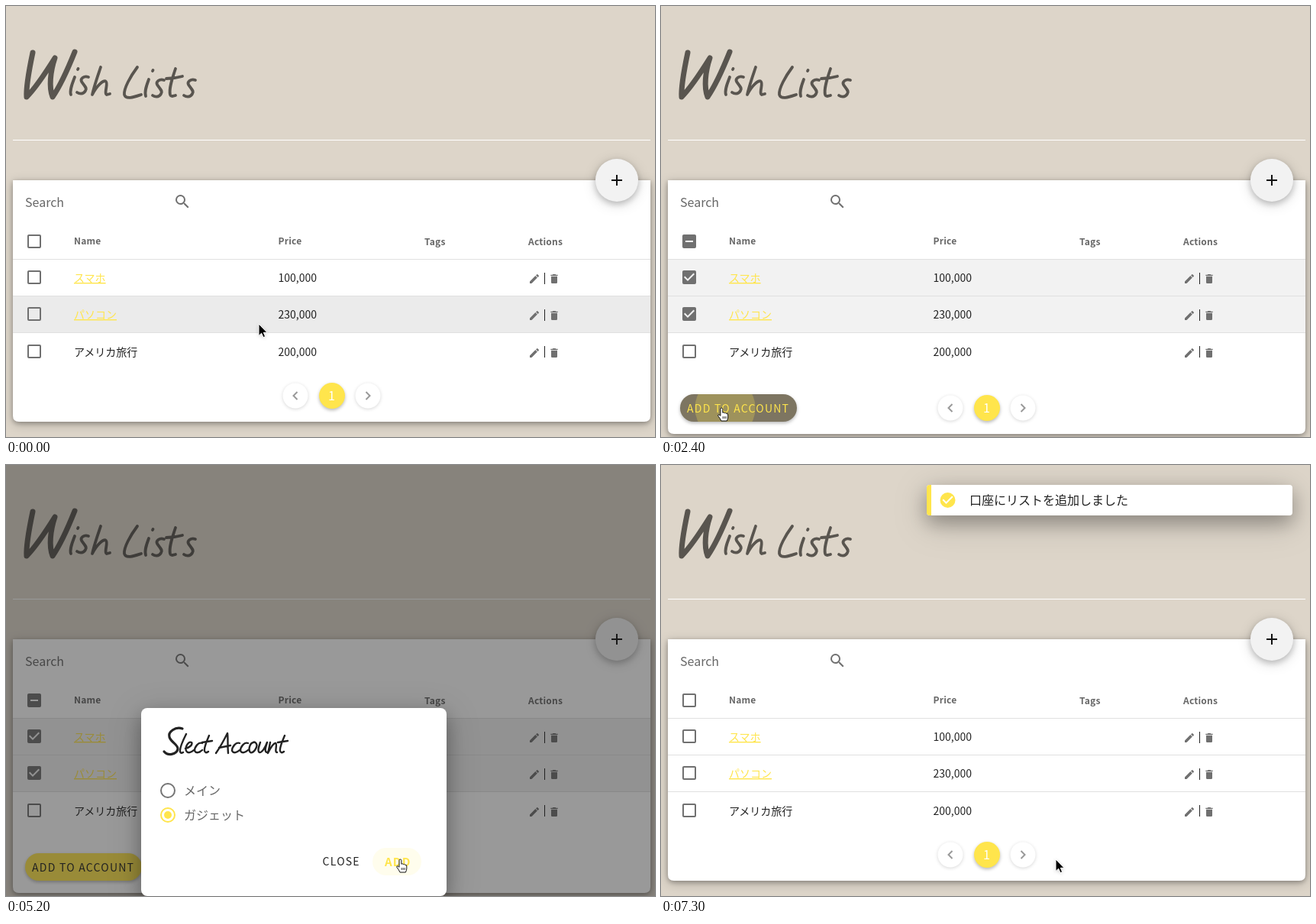
An HTML page that plays this animation: 850x564 px, repeating every 7400 ms.

```html
<!DOCTYPE html>
<html lang="ja">
<head>
<meta charset="utf-8">
<title>Wish Lists</title>
<style>
html, body { margin: 0; width: 100%; height: 100%; overflow: hidden; background: #ddd5c9; }
svg { display: block; width: 850px; height: 564px; font: 14px "Noto Sans CJK JP", "Noto Sans CJK", sans-serif; }
.ink { fill: rgba(0,0,0,.87); }
.soft { fill: rgba(0,0,0,.6); }
.icon { fill: #707070; fill-rule: evenodd; }
.yellow { fill: #ffe54c; }
.head { font-size: 12px; font-weight: 700; letter-spacing: .2px; }
.link { fill: #ffe54c; text-decoration: underline; }
.big { font-size: 16px; }
.caps { font-weight: 500; letter-spacing: 1.25px; }
.line { stroke: rgba(0,0,0,.12); }
.script { fill: none; stroke-linecap: round; stroke-linejoin: round; }
.ring { fill: none; stroke-width: 2; }
.card { filter: drop-shadow(0 2px 3px rgba(0,0,0,.28)) drop-shadow(0 3px 7px rgba(0,0,0,.2)); }
.raised { filter: drop-shadow(0 3px 4px rgba(0,0,0,.2)) drop-shadow(0 3px 8px rgba(0,0,0,.16)); }
.low { filter: drop-shadow(0 2px 2px rgba(0,0,0,.28)); }
.faint { filter: drop-shadow(0 1px 2px rgba(0,0,0,.16)); }
.high { filter: drop-shadow(0 10px 12px rgba(0,0,0,.26)) drop-shadow(0 8px 20px rgba(0,0,0,.18)); }
.halo { fill: rgba(0,0,0,.19); }
</style>
</head>
<body>
<svg id="stage" viewBox="0 0 850 564"></svg>
<script>
const LOOP = 7400, OPEN = 2450, CLOSE = 5210;
const BOX = 'M19 3H5C3.89 3 3 3.89 3 5V19A2 2 0 0 0 5 21H19A2 2 0 0 0 21 19V5C21 3.89 20.1 3 19 3Z';
const ICONS = {
  blank: BOX + 'M19 5V19H5V5Z',
  marked: BOX + 'M10 17L5 12 6.41 10.58 10 14.17 17.59 6.58 19 8Z',
  minus: BOX + 'M17 13H7V11H17Z',
  pencil: 'M20.71 7.04C21.1 6.65 21.1 6 20.71 5.63L18.37 3.29C18 2.9 17.35 2.9 16.96 3.29L15.12 5.12 18.87 8.87ZM3 17.25V21H6.75L17.81 9.93 14.06 6.18Z',
  trash: 'M19 4H15.5L14.5 3H9.5L8.5 4H5V6H19ZM6 19A2 2 0 0 0 8 21H16A2 2 0 0 0 18 19V7H6Z',
  search: 'M9.5 3A6.5 6.5 0 0 1 16 9.5C16 11.11 15.41 12.59 14.44 13.73L14.71 14H15.5L20.5 19 19 20.5 14 15.5V14.71L13.73 14.44C12.59 15.41 11.11 16 9.5 16A6.5 6.5 0 0 1 9.5 3ZM9.5 5A4.5 4.5 0 0 0 9.5 14A4.5 4.5 0 0 0 9.5 5Z',
  done: 'M12 2A10 10 0 0 0 12 22A10 10 0 0 0 12 2ZM10 17L5 12 6.41 10.59 10 14.17 17.59 6.58 19 8Z'
};
const ROWS = [
  { name: 'スマホ', price: '100,000', top: 332, mid: 355, link: true },
  { name: 'パソコン', price: '230,000', top: 380, mid: 403, link: true },
  { name: 'アメリカ旅行', price: '200,000', top: 428, mid: 452 }
];
const RADIOS = [{ label: 'メイン', y: 426 }, { label: 'ガジェット', y: 458 }];

const text = (x, y, s, cls, extra = '') => `<text x="${x}" y="${y}" class="${cls}" ${extra}>${s}</text>`;
const icon = (name, x, y, size = 24, extra = '', cls = 'icon') =>
  `<path ${extra} class="${cls}" fill-rule="evenodd" d="${ICONS[name]}" transform="translate(${x - size / 2} ${y - size / 2}) scale(${size / 24})"/>`;
const checkbox = (id, y) => icon('blank', 37, y, 24, `id="${id}"`);

// Handwritten letters
const sCurve = (x, y) => `M${x} ${y}c-6-2-11 2-9 6 3 5 8 8 5 12-3 5-8 4-11 2`;
const cCurve = x => `M${x} 364c-5-2-10 5-10 10 2 4 7 2 10-1`;
const tCurve = x => `M${x} 354c-3 7-7 16-6 20q1 4 5 1M${x - 9} 363l13-2`;
const bigW = 'M35 61C31 80 26 104 27 119C40 106 54 84 64 68C58 86 56 106 61 119C70 106 82 80 90 60';
const wishLists = 'M90 93C87 101 83 110 85 116M94 83l.5-1' + sCurve(108, 93) +
  'M124 80C120 92 115 106 113 116C119 104 128 96 131 99C134 102 128 114 132 116l4-1' +
  'M172 80C163 92 154 108 155 116C157 123 168 119 177 116' +
  'M187 96C184 104 181 112 183 118M192 85l.5-1' + sCurve(207, 97) +
  'M222 82C218 94 213 108 215 116C216 119 219 118 222 117M210 95C216 95 224 94 231 92' + sCurve(248, 97);
const bigS = 'M231 345C222 342 212 349 214 356C216 363 226 366 225 372C223 379 212 381 207 375';
const selectAccount = 'M236 352C232 360 227 370 228 375q1 3 4 1' +
  'M235 371C240 370 245 366 243 363C239 361 234 369 236 374C238 378 243 376 246 373' +
  cCurve(257) + tCurve(266) +
  'M275 377C280 370 286 359 290 351C291 358 290 368 291 377M279 370L294 367' + cCurve(306) + cCurve(317) +
  'M324 363C319 364 317 373 320 376C324 378 330 369 328 365C327 363 325 362 324 363' +
  'M333 363C331 369 329 375 332 376C335 377 340 369 342 363C340 369 338 376 342 376' +
  'M346 363C345 369 344 373 343 377C346 371 350 364 353 364C356 365 351 376 355 376' + tCurve(365);
const script = (d, color, width) => `<path class="script" d="${d}" stroke="${color}" stroke-width="${width}"/>`;

const rowMarkup = (r, i) => `
  <rect id="row${i}" x="9" y="${r.top}" width="835" height="47"/>
  ${i < 2 ? `<path class="line" d="M9 ${r.top + 47.5}H844"/>` : ''}
  <circle id="halo${i}" class="halo" cx="37" cy="${r.mid}" r="20.4"/>
  ${checkbox('check' + i, r.mid)}
  ${text(89, r.top + 29 + (i > 1), r.name, r.link ? 'link' : 'ink')}
  ${text(356.5, r.top + 29 + (i > 1), r.price, 'ink')}
  ${icon('pencil', 692, r.top + 25 + (i > 1), 16)}
  <path d="M705.5 ${r.top + 17}v15" stroke="#222"/>
  ${icon('trash', 718, r.top + 25 + (i > 1), 16)}`;

const radioMarkup = (r, i) => `
  <circle id="radioHalo${i}" class="halo" cx="212" cy="${r.y}" r="20.4"/>
  <circle id="ring${i}" class="ring" cx="212" cy="${r.y}" r="9"/>
  <circle id="dot${i}" class="yellow" cx="212" cy="${r.y}" r="5"/>
  ${text(233, r.y + 6, r.label, 'soft big')}`;

const pageArrow = (x, dir) => `<circle class="faint" cx="${x}" cy="510" r="16.5" fill="#fff"/>
  <path d="M${x - 2.5 * dir} 505l${5 * dir} 5l${-5 * dir} 5" fill="none" stroke="#999" stroke-width="2"/>`;

document.getElementById('stage').innerHTML = `
  <rect width="850" height="564" fill="#ddd5c9"/>
  <g role="img" aria-label="Wish Lists">${script(bigW, '#59554f', 7)}${script(wishLists, '#59554f', 3.8)}</g>
  <path d="M9 175.5H844" stroke="#fff"/>
  <path id="card" class="card" fill="#fff"/>
  <circle class="raised" cx="800" cy="228" r="28" fill="#f2f2f2"/>
  <path d="M793 228h14M800 221v14" stroke="#111" stroke-width="2"/>
  ${text(25, 263, 'Search', 'soft big')}
  ${icon('search', 231, 256)}
  ${checkbox('checkAll', 308)}
  ${text(89, 312, 'Name', 'soft head')}${text(356.5, 312, 'Price', 'soft head')}
  ${text(548, 313, 'Tags', 'soft head')}${text(684, 313, 'Actions', 'soft head')}
  <path class="line" d="M9 331.5H844"/>
  ${ROWS.map(rowMarkup).join('')}
  <g id="pages">${pageArrow(379, -1)}${pageArrow(474, 1)}
    <circle class="yellow low" cx="427" cy="510" r="17"/>
    ${text(426.5, 516, '1', 'big', 'fill="#fff" text-anchor="middle"')}
  </g>
  <clipPath id="pill"><rect x="25" y="508" width="153" height="36" rx="18"/></clipPath>
  <g id="button">
    <rect id="buttonFace" class="low" x="25" y="508" width="153" height="36" rx="18"/>
    <circle id="ripple" cx="84" cy="526" fill="#ffe54c" opacity=".25" clip-path="url(#pill)"/>
    ${text(34, 532, 'ADD TO ACCOUNT', 'caps', 'id="buttonText"')}
  </g>
  <rect id="overlay" width="850" height="564" fill="#212121"/>
  <g id="dialog">
    <rect class="high" x="177" y="318" width="400" height="246" rx="8" fill="#fff"/>
    <g role="img" aria-label="Slect Account">${script(bigS, '#222', 3.2)}${script(selectAccount, '#222', 2.4)}</g>
    ${RADIOS.map(radioMarkup).join('')}
    ${text(414.5, 524, 'CLOSE', 'caps ink')}
    <rect id="addHover" class="yellow" x="480" y="501" width="64" height="36" rx="18" opacity=".1"/>
    ${text(496, 525, 'ADD', '', 'id="add" font-size="15" font-weight="700" letter-spacing="1.25"')}
  </g>
  <g id="toast">
    <rect class="high" x="348" y="26" width="479" height="40" rx="4" fill="#fff"/>
    <path class="yellow" d="M354 26V66H352Q348 66 348 62V30Q348 26 352 26Z"/>
    ${icon('done', 375.5, 46, 24, '', 'yellow')}
    ${text(404, 52, '口座にリストを追加しました', 'ink big')}
  </g>
  <g id="cursor" stroke-linejoin="round">
    <path id="arrow" class="faint" d="M0 0V15.5L3.6 12.2 6 17.6 8.6 16.5 6.3 11.3H11Z" stroke="#fff"/>
    <g id="hand" stroke="#111" fill="#fff">
      <path d="M-2 1.5Q-2 0-.6 0T.9 1.5V6.2Q2.4 5 3.3 6.6 5 5.8 5.7 7.3 7.8 6.8 7.8 9V12Q7.8 14 6.4 17H-1Q-2.5 13.5-5.2 10.3-5.5 8.6-3.8 8.8L-2 10.3Z"/>
      <path d="M1.2 11v3M3.2 11v3M5.2 11v3" stroke-width=".8"/>
    </g>
  </g>`;

const el = {};
document.querySelectorAll('[id]').forEach(node => el[node.id] = node);
const set = (id, attrs) => { for (const key in attrs) el[id].setAttribute(key, attrs[key]); };
const show = (id, on) => set(id, { visibility: on ? 'visible' : 'hidden' });
const clamp = v => Math.min(1, Math.max(0, v));
const scaleAbout = (x, y, k) => `translate(${x} ${y}) scale(${k}) translate(${-x} ${-y})`;

// cubic-bezier(.25, .8, .25, 1)
function ease(x) {
  if (x <= 0 || x >= 1) return clamp(x);
  let lo = 0, hi = 1;
  for (let i = 0; i < 20; i++) {
    const s = (lo + hi) / 2;
    if (.75 * s * (1 - s) + s ** 3 < x) lo = s; else hi = s;
  }
  return 2.4 * lo * (1 - lo) ** 2 + 3 * lo * lo * (1 - lo) + lo ** 3;
}

// Pointer stops: time, x, y
const PATH = [
  [0, 331, 416], [150, 331, 416], [800, 38, 352], [1050, 38, 352], [1400, 39.5, 400], [1800, 39.5, 400],
  [2280, 79.5, 526], [2450, 80, 526], [2600, 92, 509], [3200, 212, 424], [3600, 212, 424],
  [4000, 211, 443], [4150, 212, 455], [4300, 212, 455], [4800, 517, 516], [LOOP, 517, 516]
];
function pointerAt(t) {
  const i = PATH.findIndex(p => p[0] > t);
  const [t0, x0, y0] = PATH[i - 1], [t1, x1, y1] = PATH[i];
  const k = (t - t0) / (t1 - t0), s = k * k * (3 - 2 * k);
  return [x0 + (x1 - x0) * s, y0 + (y1 - y0) * s];
}

function draw(t) {
  const [x, y] = pointerAt(t);
  const inside = (l, top, r, b) => x >= l && x < r && y >= top && y < b;
  const modal = t >= OPEN && t < CLOSE;
  const checks = [950, 1700, Infinity].map(start => t >= start && t < CLOSE);
  const selected = checks[0];
  const choice = t < 3500 ? -1 : t < 4200 ? 0 : 1;
  let hot = false;

  const bottom = selected ? 560 : 544;
  set('card', { d: `M9 228H844V${bottom - 8}q0 8-8 8H17q-8 0-8-8Z` });
  set('checkAll', { d: ICONS[selected ? 'minus' : 'blank'] });
  set('pages', { transform: `translate(0 ${selected ? 16 : 0})` });

  ROWS.forEach((r, i) => {
    const hover = !modal && inside(9, r.top, 844, r.top + 48);
    const over = hover && Math.abs(x - 37) < 17 && Math.abs(y - r.mid) < 17;
    set('row' + i, { fill: hover ? '#ebebeb' : checks[i] ? '#f2f2f2' : '#fff' });
    set('check' + i, { d: ICONS[checks[i] ? 'marked' : 'blank'] });
    show('halo' + i, over);
    hot ||= over || hover && r.link && inside(89, r.mid - 8, 89 + r.name.length * 14, r.mid + 10);
  });

  const onButton = selected && !modal && inside(25, 508, 178, 544);
  show('button', selected);
  set('buttonFace', { fill: onButton ? '#7d7561' : '#ffe54c' });
  set('buttonText', { fill: onButton ? '#ffe54c' : '#222' });
  set('ripple', { r: onButton ? 78 * clamp((t - 2340) / 120) : 0 });

  const openness = t < CLOSE ? ease((t - OPEN) / 300) : 1 - ease((t - CLOSE) / 300);
  set('overlay', { opacity: .46 * openness });
  set('dialog', { opacity: openness, transform: scaleAbout(377, 441, .5 + openness / 2) });
  RADIOS.forEach((r, i) => {
    const over = modal && Math.abs(x - 212) < 17 && Math.abs(y - r.y) < 16;
    show('radioHalo' + i, over);
    set('ring' + i, { stroke: choice === i ? '#ffe54c' : '#757575' });
    set('dot' + i, { r: choice === i ? 5 : 0 });
    hot ||= over;
  });
  const onAdd = modal && inside(480, 501, 544, 537);
  set('addHover', { opacity: onAdd ? .1 : 0 });
  set('add', { fill: choice < 0 ? '#bdbdbd' : '#ffe54c' });

  const shown = ease((t - 5450) / 220);
  set('toast', { opacity: shown, transform: scaleAbout(587.5, 46, .8 + .2 * shown) });

  hot ||= onButton || onAdd;
  set('cursor', { transform: `translate(${x} ${y})` });
  show('hand', hot);
  show('arrow', !hot);
}

const start = performance.now();
function tick() {
  draw((performance.now() - start) % LOOP);
  requestAnimationFrame(tick);
}
tick();
</script>
</body>
</html>
```
